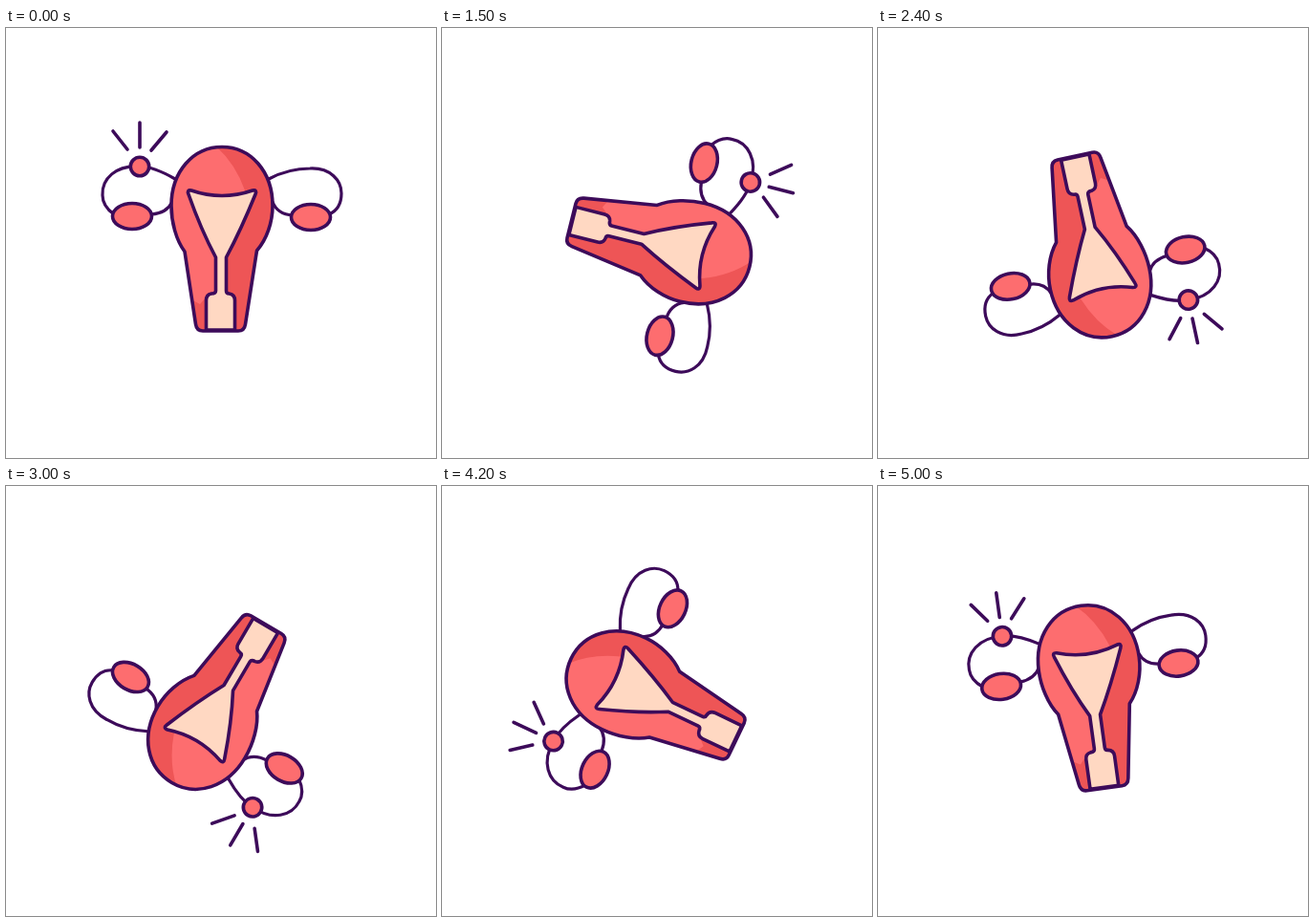
Animation of 450 by 450 pixels, one loop 5.1 s. Source, as an HTML page:

```html
<!DOCTYPE html>
<html lang="en">
<head>
<meta charset="utf-8">
<style>
  html, body { margin: 0; width: 100%; height: 100%; overflow: hidden; background: #fff; }
  svg { display: block; width: 100vw; height: 100vh; }
  .line { fill: none; stroke: #3d0b5a; stroke-width: 3.6; stroke-linecap: round; stroke-linejoin: round; }
  .thin { stroke-width: 3.2; }
  .coral { fill: #fd6d6f; }
  .shade { fill: #ee5556; }
  .cream { fill: #ffd8c2; }
</style>
</head>
<body>
<svg viewBox="0 0 450 450">
  <defs>
    <path id="body" d="M187 234C178 222 173 203 173 186C173 150 196 124.500 226 124.500S279 150 279 186C279 203 273 221 262.500 233L250.500 310Q249.500 317 243 317H206Q199.500 317 198.500 310Z"/>
    <clipPath id="inside"><use href="#body"/></clipPath>
  </defs>
  <g id="organ">
    <!-- tubes -->
    <path class="line thin" d="M177 158C165 151 152 145 140 145C115 143 100 158 101 175C101 184 106 190 113 195M152 195Q168 194 174 182
      M275 158C290 150 305 147 318 147C340 146 351 160 351 173C351 185 345 192 338 195M300 196Q284 195 279 182"/>
    <g class="line">
      <ellipse class="coral" cx="132" cy="197" rx="20.5" ry="13.5"/>
      <ellipse class="coral" cx="319" cy="198" rx="20.5" ry="13.5"/>
      <circle class="coral" cx="140" cy="145" r="9.7"/>
    </g>
    <path class="line" d="M112 108L127 127M140 99V125M168 109L152 128"/>
    <use href="#body" class="coral"/>
    <g class="shade" clip-path="url(#inside)">
      <path d="M220 124Q240 142 250 170L227 230V318H290V124Z"/>
      <path d="M190 282L203 289L210 281V320H190Z"/>
    </g>
    <g class="line">
      <path class="cream" d="M194 170Q226 181 258 170Q263 169 261 174Q246 211 230.500 240V275Q230.500 278 233.500 278Q239.500 279 239.500 285V316H209.500V285Q209.500 279 215 278Q219.500 278 219.500 275V240Q204 211 191 174Q189 169 194 170Z"/>
      <use href="#body"/>
    </g>
  </g>
</svg>
<script>
  const LOOP = 5100, STEP = 100;
  const organ = document.getElementById('organ');

  function draw() {
    const time = Math.floor(performance.now() % LOOP / STEP) * STEP;
    const angle = Math.max(0, time * 0.0709 - 2.3);
    organ.setAttribute('transform', `rotate(${angle} 225 224.6)`);
    requestAnimationFrame(draw);
  }
  draw();
</script>
</body>
</html>
```
